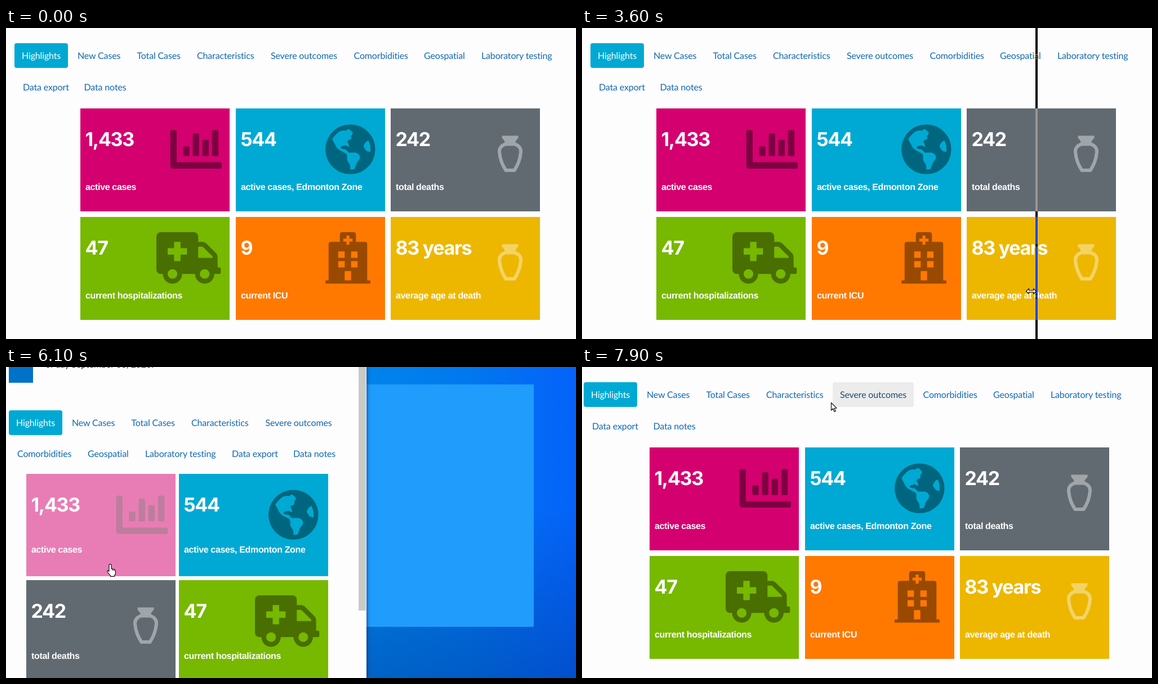
An HTML page for the animation above (8000 ms loop, 1012 by 553 pixels).

```html
<!DOCTYPE html>
<html lang="en">
<head>
<meta charset="utf-8">
<title>Case dashboard</title>
<style>
html, body { margin: 0; width: 100%; height: 100%; overflow: hidden; }
#stage {
  position: absolute; left: 0; top: 0; width: 1012px; height: 553px; overflow: hidden;
  background:
    linear-gradient(transparent 45%, rgba(0, 50, 140, .4)),
    linear-gradient(90deg, #0084ec 640px, #0078ee 820px, #0562fa 1012px);
  text-rendering: geometricPrecision;
}
#stage * { position: absolute; box-sizing: border-box; white-space: nowrap; }
#pane { left: 506px; top: 31px; width: 431px; height: 431px; background: #209cfc; }
#page { left: 0; top: 0; width: 1012px; height: 553px; overflow: hidden; background: #fdfdfd; }
.narrow #page { width: 640px; box-shadow: 1px 0 6px rgba(0, 20, 70, .6); }
#body { left: 0; top: 0; width: 100%; height: 100%; }
.extra { display: none; }
.narrow .extra { display: block; }
#block { left: 5px; top: 0; width: 43px; height: 28px; background: #0072c8; }
#date { left: 70px; top: -14px; font: 16px/20px Lato, sans-serif; letter-spacing: -.1px; color: #222; }
#bar { left: 626px; top: 0; width: 13px; height: 433px; background: #c9c9c9; }
.tab {
  height: 44px; padding: 0 13px; border-radius: 4px; margin-left: -13px;
  font: 16px/46px Lato, sans-serif; letter-spacing: -.15px; color: #1268b3;
}
.tab.active { background: #00a9d3; color: #fff; }
.tab.over { background: #ececec; color: #204c73; }
.card { width: 265px; height: 183px; color: #fff; }
.narrow .card { height: 182px; }
.card.over { opacity: .5; }
.card svg { left: 0; top: 0; width: 265px; height: 183px; }
.card b { left: 8.5px; top: 36px; font: 700 34px/40px Inter, sans-serif; letter-spacing: -1.3px; }
.card span {
  left: 9px; top: 131px; letter-spacing: -.35px;
  font: 700 16px/20px "Liberation Sans", Arial, sans-serif;
}
.narrow .card span { top: 126px; }
#line { top: 0; width: 4px; height: 553px; background: #fff; mix-blend-mode: difference; }
#cursor { left: 0; top: 0; width: 24px; height: 26px; overflow: visible; }
#cursor path { fill: #fff; stroke: #000; stroke-width: 1.1; stroke-linejoin: round; }
</style>
</head>
<body>
<div id="stage">
  <div id="pane"></div>
  <div id="page">
    <div id="body">
      <div id="block" class="extra"></div>
      <div id="date" class="extra">of day September 06, 2020.</div>
      <div id="bar" class="extra"></div>
    </div>
  </div>
  <div id="line"></div>
  <svg id="cursor"><path/></svg>
</div>
<script>
const LOOP = 8000, STEP = 100;
const $ = id => document.getElementById(id);

const block = (x, y, w, h, r) => `<rect x="${x}" y="${y}" width="${w}" height="${h}" rx="${r}"/>`;
const hole = (x, y, w, h) => `M${x} ${y}h${w}v${h}h${-w}z`;
const disc = (x, y, r) => `M${x - r} ${y}a${r} ${r} 0 1 0 ${2 * r} 0a${r} ${r} 0 1 0 ${-2 * r} 0z`;
const plus = (x, y, half, arm) => {
  const d = half - arm, a = 2 * arm;
  return `M${x - arm} ${y - half}h${a}v${d}h${d}v${a}h${-d}v${d}h${-a}v${-d}h${-d}v${-a}h${d}z`;
};
const solid = d => `<path fill-rule="evenodd" d="${d}"/>`;
const icon = (x, y, art, color = '#000', scale = .1786) =>
  `<svg viewBox="0 0 265 183"><g opacity=".4" fill="${color}" stroke="none"
    transform="translate(${x} ${y}) scale(${scale})">${art}</g></svg>`;

const chart = icon(159.5, 27,
  solid('M496 384H64V80q0-16-16-16H16Q0 64 0 80v336q0 32 32 32h464q16 0 16-16v-32q0-16-16-16z') +
  [224, 96, 160, 64].map((top, i) => block(128 + 96 * i, top, 64, 324 - top, 14)).join(''));

const globe = icon(159, 28.5, solid(disc(248, 248, 248) +
  'M68 145Q108 88 150 64L189 59Q216 67 216 51L240 48 269 77Q278 88 264 104L253 118Q262 134 252 148' +
  'L236 152 221 164Q218 172 222 178L236 210Q238 221 228 221L206 210 190 208 159 218Q142 232 158 240' +
  'Q175 248 200 248L232 280H299Q312 280 321 289L335 303Q355 327 330 358L313 379 291 443' +
  'Q270 448 248 448V420Q245 392 225 369 216 360 216 346V314Q216 295 199 286L151 260Q115 242 100 207z' +
  'M417 266Q408 263 403 256L385 229Q377 216 385 203L404 173 427 159Q456 212 446 274z'));

const truck = icon(135, 27, solid(
  'M624 352h-16V244q0-20-14-34L494 110q-14-14-34-14h-44V48q0-48-48-48H48Q0 0 0 48v320q0 48 48 48h16' +
  'a96 96 0 0 0 192 0h128a96 96 0 0 0 192 0h48q16 0 16-16v-32q0-16-16-16z' +
  disc(160, 416, 48) + disc(480, 416, 48) + plus(208, 192, 96, 32) + 'M560 256H416V144h44l100 100z'));

const hospital = icon(159, 27, solid(
  'M448 492v20H0v-20q0-12 12-12h20V120q0-24 24-24h88V24q0-24 24-24h112q24 0 24 24v72h88q24 0 24 24' +
  'v360h20q12 0 12 12z' + plus(224, 79, 46, 15) +
  [128, 256].map(x => hole(x, 192, 64, 64) + hole(x, 288, 64, 64)).join('') + hole(192, 388, 64, 92)));

const vase = icon(.5, -.5,
  '<path d="M197 49h29v4l-5 6 1 6h-21l1-6-5-6z"/>' +
  '<path fill="none" stroke="#fff" stroke-width="6" d="M203 64Q192 68 192.5 78 194 96 204 110.5H219Q229 96 230.5 78 231 68 220 64z"/>',
  '#fff', 1);

// text, wide x and row, narrow x and row
const tabs = [
  ['Highlights', 28, 0, 18, 0], ['New Cases', 127, 0, 117, 0], ['Total Cases', 232.5, 0, 222.5, 0],
  ['Characteristics', 339, 0, 329, 0], ['Severe outcomes', 470, 0, 460.5, 0],
  ['Comorbidities', 617.5, 0, 20, 1], ['Geospatial', 742, 0, 145, 1],
  ['Laboratory testing', 844, 0, 247, 1], ['Data export', 30, 1, 401, 1], ['Data notes', 138.5, 1, 510, 1]
];
const cards = [
  ['1,433', 'active cases', '#d4006f', chart],
  ['544', 'active cases, Edmonton Zone', '#00a9d3', globe],
  ['242', 'total deaths', '#616a71', vase],
  ['47', 'current hospitalizations', '#77b800', truck],
  ['9', 'current ICU', '#ff7900', hospital],
  ['83 years', 'average age at death', '#edb700', vase]
];

function add(cls, html) {
  const el = document.createElement('div');
  el.className = cls;
  el.innerHTML = html;
  $('body').append(el);
  return el;
}
const tabEls = tabs.map(([text], i) => add(i ? 'tab' : 'tab active', text));
const cardEls = cards.map(([num, label, color, art]) => {
  const el = add('card', `${art}<b>${num}</b><span>${label}</span>`);
  el.style.background = color;
  return el;
});

const cardAt = (i, narrow) => narrow
  ? [i % 2 ? 307 : 36, 190 + 189 * Math.floor(i / 2)]
  : [[132, 408, 683][i % 3], i < 3 ? 143 : 335.5];

function move(el, x, y) {
  el.style.left = x + 'px';
  el.style.top = y + 'px';
}
function layout(narrow) {
  $('stage').classList.toggle('narrow', narrow);
  tabs.forEach(([, wx, wr, nx, nr], i) =>
    narrow ? move(tabEls[i], nx, 77 + 55 * nr) : move(tabEls[i], wx, 27 + 56 * wr));
  cardEls.forEach((el, i) => move(el, ...cardAt(i, narrow)));
}

// Pointer runs of [time, x, y]; the pointer is hidden between runs.
const runs = [
  { keys: [[100, 290, 2], [300, 272, 170], [500, 230, 250], [700, 230, 250], [900, 549, 250],
    [1000, 560, 240], [1200, 560, 240], [1500, 800, 240], [1600, 800, 240], [1700, 800, 360],
    [1900, 581, 399], [2000, 560, 405], [2200, 270, 420], [2500, 270, 420]] },
  { resize: true, keys: [[3600, 797.5, 468], [3900, 631, 468], [5400, 631, 468]] },
  { keys: [[5400, 512, 322], [5500, 450, 420], [5700, 200, 450], [5900, 170, 430], [6000, 170, 430],
    [6200, 200, 270], [6300, 430, 270], [6400, 600, 300], [6500, 600, 300], [6700, 631, 400]] },
  { resize: true, keys: [[6700, 631, 400], [6800, 631, 400], [7100, 1012, 400]] },
  { keys: [[7600, 960, 250], [7700, 800, 125], [7900, 442, 63], [8000, 442, 63]] }
];
const shapes = {
  hand: [-6, 0, 'M6 .6q2 0 2 2v6l5.5 1.4q2 .6 2 2.6v3q0 3-2 5.4v1.4H6.5V21L1.2 14.5q-1-2 .6-2.8l2.2 1.6V2.6q0-2 2-2zM10 12v-3M13 13v-3'],
  arrow: [0, 0, 'M.5.5V14l3.2-3 2.4 5.5 2.2-1L5.9 10.2H10z'],
  resize: [-9.5, -5, 'M.5 5l5-4.5v3h8v-3l5 4.5-5 4.5v-3h-8v3z']
};

function pointer(t) {
  const run = runs.find(r => t >= r.keys[0][0] && t < r.keys.at(-1)[0]);
  if (!run) return null;
  const i = run.keys.findIndex(k => k[0] > t);
  const [t0, x0, y0] = run.keys[i - 1], [t1, x1, y1] = run.keys[i];
  const p = (t - t0) / (t1 - t0);
  return { x: x0 + (x1 - x0) * p, y: y0 + (y1 - y0) * p, resize: run.resize };
}

let last = -1;
function draw(now) {
  const t = Math.floor(now % LOOP / STEP) * STEP;
  if (t === last) return;
  last = t;
  const narrow = t >= 4100 && t < 7500, shift = t >= 7500 ? -12 : 0;
  layout(narrow);
  $('body').style.left = shift + 'px';

  const at = pointer(t);
  let onCard = false;
  cardEls.forEach((el, i) => {
    const [x, y] = cardAt(i, narrow);
    const dx = at ? at.x - shift - x : -1, dy = at ? at.y - y : -1;
    const over = !!at && !at.resize && dx >= 0 && dx < 265 && dy >= 0 && dy < 183;
    el.classList.toggle('over', over);
    onCard = onCard || over;
  });
  tabEls[4].classList.toggle('over', t >= 7900);

  $('cursor').style.display = at ? '' : 'none';
  if (at) {
    const [ox, oy, d] = shapes[at.resize ? 'resize' : onCard ? 'hand' : 'arrow'];
    $('cursor').firstChild.setAttribute('d', d);
    move($('cursor'), at.x + ox, at.y + oy);
  }
  const dragging = (t >= 3600 && t < 4100) || (t >= 6900 && t < 7100);
  $('line').style.display = dragging ? '' : 'none';
  if (dragging) $('line').style.left = Math.round(at.x + 7.5) + 'px';
}
const start = performance.now();
function tick() {
  draw(performance.now() - start);
  requestAnimationFrame(tick);
}
tick();
</script>
</body>
</html>
```
